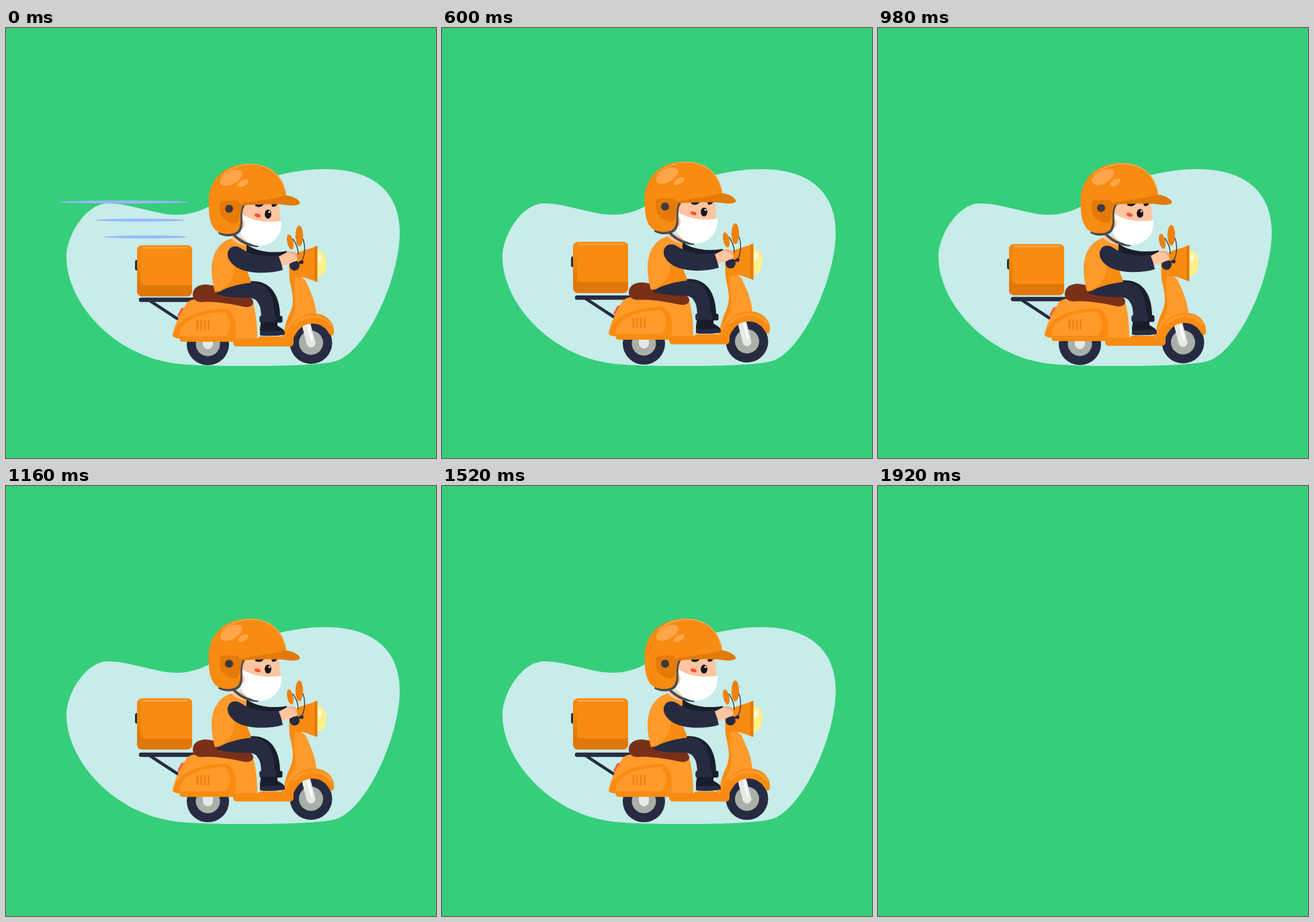
Write an HTML page that moves like this. It is 640 px wide and 640 px high and loops after 1940 ms.

```html
<!DOCTYPE html>
<html lang="en">
<head>
<meta charset="utf-8">
<title>Scooter courier</title>
<style>
  html, body { margin: 0; width: 100%; height: 100%; overflow: hidden; background: #36ce7b; }
  svg { display: block; width: 100vw; height: 100vh; }
  .light { fill: #ff9a2b; } .orange { fill: #f88b11; } .dark { fill: #e37a0a; }
  .navy { fill: #272b42; } .black { fill: #191d2b; } .skin { fill: #ffc5a0; }
  .stroke { fill: none; stroke-linecap: round; }
</style>
</head>
<body>
<svg viewBox="0 0 640 640">
  <defs>
    <linearGradient id="boxSide" x2="0" y2="1">
      <stop offset=".3" stop-color="#f48810"/><stop offset=".8" stop-color="#df7809"/>
    </linearGradient>
  </defs>
  <g id="scene">
    <path fill="#c7ece9" d="M90 341C90 310 118 261 152 261C186 261 222 278 254 278C308 278 330 236 405 219C430 213 452 210 475 210C545 210 586 243 586 305C586 370 538 482 490 496C472 501 420 503 370 503C320 503 300 503 270 501C165 496 90 410 90 341Z"/>
    <g id="lines" fill="#98b8fb"></g>

    <!-- data-lift: rise in px at the top of the bounce -->
    <g data-lift="1.4">
      <circle class="navy" cx="300.5" cy="470.5" r="31.5"/>
      <circle cx="300.5" cy="470.5" r="18" fill="#a9b0a8"/>
      <rect x="293" y="450" width="15" height="28" rx="7.5" fill="#e6e9e6"/>
    </g>
    <g data-lift="3">
      <circle class="navy" cx="454" cy="468.5" r="31.5"/>
      <circle cx="454" cy="468.5" r="18" fill="#a9b0a8"/>
      <path class="stroke" stroke="#e6e9e6" stroke-width="13" d="M447 442L454 469"/>
      <path class="stroke" stroke="#fff" stroke-width="3" d="M450 443L455 464"/>
    </g>
    <g data-lift="7.3">
      <rect class="navy" x="192" y="345" width="7" height="16" rx="3"/>
      <rect x="195" y="323.5" width="82" height="76" rx="7" fill="url(#boxSide)"/>
      <path class="orange" d="M201 323.5H270Q277 323.5 277 330.500V383H208Q201 383 201 376Z"/>
      <path class="stroke" stroke="#ffa641" stroke-width="2.500" d="M204 327H270"/>
    </g>

    <g data-lift="4.6">
      <path class="stroke" stroke="#272b42" stroke-width="6.500" d="M201 404.500H290"/>
      <path class="stroke" stroke="#272b42" stroke-width="4.500" d="M214 406L260 436"/>
      <path fill="#ff5440" d="M255 428L261 417L270 415L261 433Z"/>

      <!-- scooter -->
      <path class="light" d="M248 457C251 440 262 420 270 408C278 402 300 400 330 402L368 408C373 430 374 445 374 464L340 467H263C259 467 258 464 259 462C252 462 248 460 248 457Z"/>
      <path class="orange" d="M249 457C254 437 276 419 328 418C342 424 346 448 339 467H263C259 467 258 464 259 462C252 462 248 460 249 457Z"/>
      <path class="light" d="M259 459C255 444 278 423 326 423C335 432 337 450 326 459Z"/>
      <path class="stroke" stroke="#ee8010" stroke-width="2.500" d="M285 435.500V449M290.500 435.500V449M296 435.500V449M301.500 435.500V449"/>
      <path class="orange" d="M338 462H374L378 459H428V468Q428 474 422 474H344Q338 474 338 468Z"/>
      <path class="light" d="M422 374C426 395 432 408 420 430C414 444 415 455 409 459L420 472C424 455 442 440 462 427C461 408 453 391 446 376C440 368 425 368 422 374Z"/>
      <path class="orange" d="M422 372C426 395 432 408 420 430L414 450C429 430 432 421 430 404C428 390 428 382 430 373Z"/>
      <path class="orange" d="M410 473C418 442 435 425 459 425C478 425 490 440 488 454C487 459 484 459 481 455C476 446 468 440 456 440C438 440 430 455 424 471Q422 474 418 474Z"/>
      <path class="stroke" stroke="#ff9a2b" stroke-width="4" d="M429 441C446 425 472 426 483 442"/>
      <ellipse cx="466" cy="351" rx="11" ry="19" fill="#fff08e"/>
      <ellipse cx="467" cy="343" rx="2.500" ry="6" fill="#fffde8"/>
      <path class="orange" d="M463 324V378L446 372C440 370 428 372 422 374L421 345C430 332 448 331 463 324Z"/>
      <path class="dark" d="M459 326L463.500 324V378L459 376Z"/>
      <g fill="#f0810d">
        <ellipse cx="423" cy="318.500" rx="4.500" ry="11.500" transform="rotate(-12 423 318.500)"/>
        <ellipse cx="436.500" cy="309.500" rx="5.700" ry="15.500"/>
      </g>
      <path class="stroke" stroke="#272b42" stroke-width="1.200" d="M427 314C432 321 435 327 435 337M442 314C446 325 445 338 440 348"/>

      <!-- seat and legs -->
      <path fill="#7a3018" d="M278 397C278 386 288 381 300 382L340 388C360 398 368 402 368 408C368 414 362 416 355 415C335 411 310 406 292 408C282 408 278 403 278 397Z"/>
      <path class="black" d="M355 378C385 372 408 387 408 432H390Z"/>
      <path class="black" d="M380 434H404V443C408 446 415 448 415 454V456C402 459 388 458 378 457V447Z"/>
      <path class="navy" d="M378 450C390 454 405 447 415 453V456Q402 459 380 458Q378 457 378 450Z"/>

      <!-- rider -->
      <path class="black" d="M357 320C365 330 390 337 418 332L419 341C395 344 370 344 357 337Z"/>
      <path fill="#efae89" d="M416 335C422 331 432 332 434 338L425 344Z"/>
      <path class="light" d="M337 313C318 317 306 335 306 360C306 375 309 385 311 393L360 386C366 382 365 376 362 370C357 360 358 340 358 322Z"/>
      <path class="orange" d="M340 356C340 372 333 384 316 391L362 382C366 380 364 375 362 370L357 358Z"/>
      <path class="skin" d="M337 307L358 314V324C348 323 341 319 336 314Z"/>
      <path class="navy" d="M313 396C325 386 350 380 368 379C390 379 400 400 400 432L380 433C380 414 376 404 365 402C350 401 330 402 313 396Z"/>
      <rect class="black" x="377.500" y="428.500" width="34" height="10" rx="2.500"/>
      <rect class="navy" x="377.500" y="428.500" width="25" height="9" rx="2.500"/>
      <path class="navy" d="M330 335C332 324 343 323 350 328C365 338 385 342 407 338L412 360C390 367 355 366 340 354C333 348 329 342 330 335Z"/>
      <circle class="navy" cx="429.500" cy="353.500" r="7.500"/>
      <path class="stroke" stroke="#272b42" stroke-width="3" d="M430 352L440 348"/>
      <circle class="navy" cx="440" cy="348.500" r="2.800"/>
      <path class="skin" d="M406 340L416 335C425 334 434 339 434 344C434 348 428 347 424 350L411 354Z"/>

      <!-- head -->
      <path class="skin" d="M349 260H406L409 290L352 303Z"/>
      <path class="black" d="M350 260H360L352 267ZM371 262H384Q379 269 371 265ZM395 262H404Q401 267 396 266Z"/>
      <ellipse cx="390" cy="277" rx="4.900" ry="6.700" fill="#17151a"/>
      <circle cx="392" cy="274" r="1.400" fill="#fff"/>
      <ellipse cx="374.500" cy="279" rx="4.700" ry="2.600" fill="#ff4f38" transform="rotate(18 374.500 279)"/>
      <path class="stroke" stroke="#4b4a4c" stroke-width="4" d="M339 308C349 318 360 324 374 324"/>
      <path fill="#fff" d="M351 277C370 289 390 290 410 287C412 305 400 322 380 324C365 325 353 315 349 305Z"/>
      <ellipse class="skin" cx="351" cy="292" rx="4" ry="7"/>
      <path class="stroke" stroke="#4b4a4c" stroke-width="4" d="M354 263C345 276 354 292 347 302C342 309 328 310 318 305"/>
      <path class="orange" d="M301.500 262C300 225 326 202 362 202C392 202 414 222 417 248L414 255L352 264C346 278 352 290 346 300C341 308 322 309 312 301C303 292 302 278 301.500 262Z"/>
      <path class="dark" d="M318 263Q318 257 326 257H344L352 264C347 275 350 285 344 290C340 293 334 290 328 287C320 283 318 274 318 263Z"/>
      <path class="dark" d="M346 262C370 256 398 256 414 249C424 249 435 254 437.500 260C438 264 428 265 420 264C400 261 375 263 352 264Z"/>
      <circle cx="332" cy="269" r="6" fill="#3d3a3c"/>
      <path class="stroke" stroke="#ffa648" stroke-width="1.800" d="M322 219C349 194 402 197 414 238"/>
      <g fill="#ffa64a">
        <ellipse cx="335" cy="223" rx="18" ry="9.500" transform="rotate(-29 335 223)"/>
        <ellipse cx="353" cy="231" rx="9" ry="4.300" transform="rotate(-29 353 231)"/>
      </g>
    </g>
  </g>
</svg>
<script>
  const LOOP = 1940, BLANK = 1920, HOP = 1000 / 3, STOP = 5.5 * HOP;
  const scene = document.getElementById('scene');
  const parts = [...scene.querySelectorAll('[data-lift]')];

  // Speed lines shrink towards their right end, one after another.
  const lines = [
    { left: 78, right: 270, y: 259, start: 0 },
    { left: 133, right: 266, y: 286, start: 167 },
    { left: 146, right: 270, y: 311, start: 100 }
  ].map(line => {
    const el = document.createElementNS('http://www.w3.org/2000/svg', 'ellipse');
    el.setAttribute('cy', line.y);
    el.setAttribute('ry', 2.2);
    document.getElementById('lines').append(el);
    return { ...line, el };
  });

  const clamp = v => Math.min(1, Math.max(0, v));

  function draw(t) {
    scene.style.display = t < BLANK ? '' : 'none';
    const phase = Math.min(t, STOP) / HOP % 1;
    const height = 1 - Math.abs(2 * phase - 1) ** 2.3;
    for (const part of parts)
      part.setAttribute('transform', `translate(0 ${-height * part.dataset.lift})`);
    for (const { left, right, start, el } of lines) {
      const p = clamp((t - start) / HOP);
      const half = (right - left) / 2 * (1 - p ** 2.4);
      el.setAttribute('cx', right - half);
      el.setAttribute('rx', half);
      el.setAttribute('opacity', 1 - p);
    }
  }

  const begin = performance.now();
  function tick() {
    draw((performance.now() - begin) % LOOP);
    requestAnimationFrame(tick);
  }
  tick();
</script>
</body>
</html>
```
